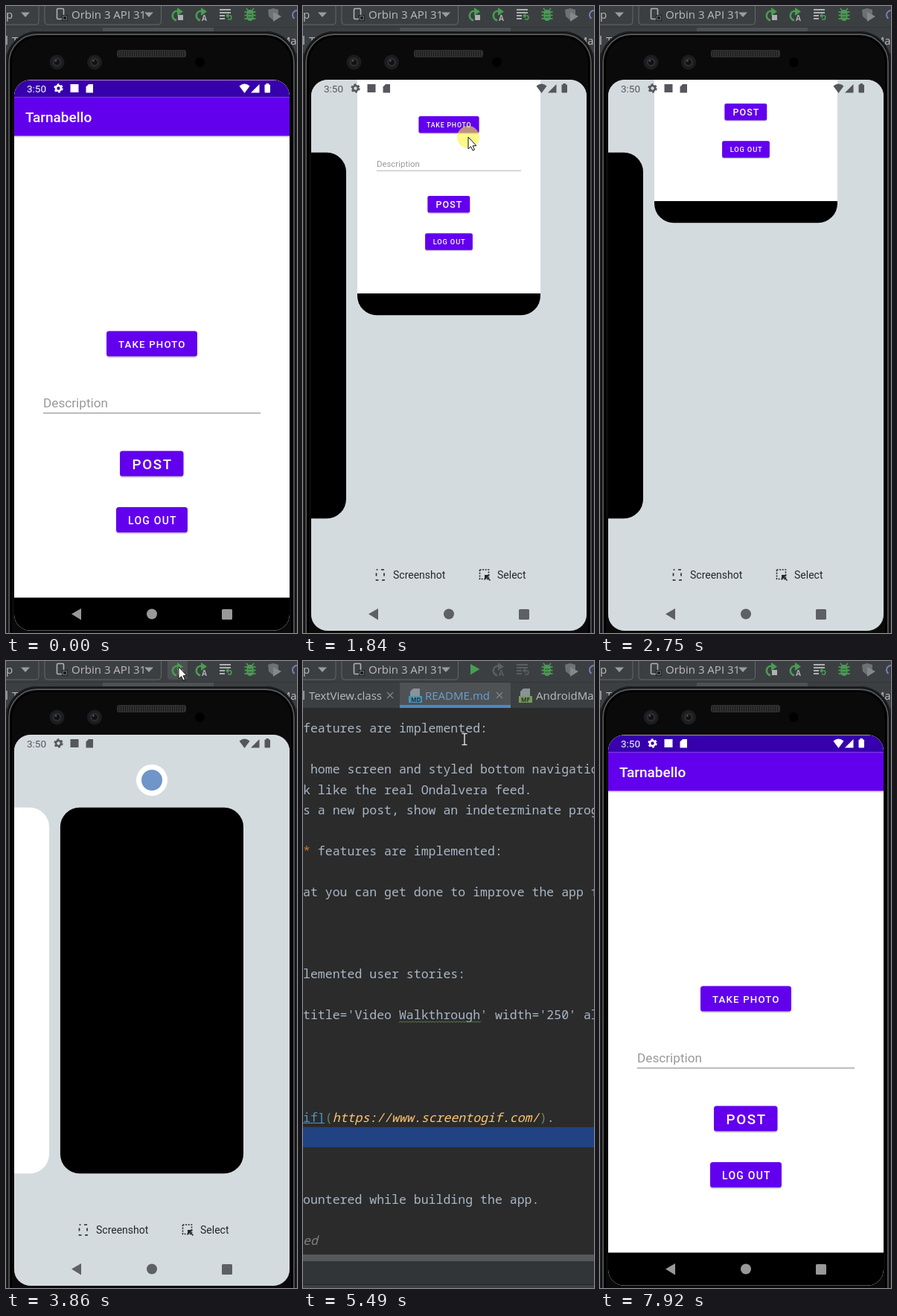
Write an HTML page with a canvas that moves like this. It is 391 px wide and 842 px high and loops after 8 s.

```html
<!DOCTYPE html>
<html lang="en">
<head>
<meta charset="utf-8">
<title>Emulator walkthrough</title>
<style>
  html, body { margin: 0; width: 100%; height: 100%; overflow: hidden; background: #2b2b2b; }
  canvas { display: block; }
</style>
</head>
<body>
<canvas id="stage" width="391" height="842"></canvas>
<script>
const LOOP = 8000;
const ctx = document.getElementById('stage').getContext('2d');
const UI = '"Open Sans", sans-serif', ROBOTO = 'Roboto, sans-serif', MONO = '"Noto Sans Mono", monospace';
const GREEN = '#499c54', DIM = '#5c5f61', GREY = '#afb1b3';

// Keys are [time, ...values]; eased between neighbours, held outside.
function track(t, keys) {
  if (t <= keys[0][0]) return keys[0].slice(1);
  for (let i = 1; i < keys.length; i++) {
    const a = keys[i - 1], b = keys[i];
    if (t < b[0]) {
      const p = (t - a[0]) / (b[0] - a[0]), e = p * p * (3 - 2 * p);
      return a.slice(1).map((v, j) => v + (b[j + 1] - v) * e);
    }
  }
  return keys[keys.length - 1].slice(1);
}

const CURSOR = [
  [500, 297, 850], [640, 297, 807], [1300, 297, 807], [1600, 222, 449], [1840, 222, 176],
  [2120, 222, 149], [2190, 222, 149], [2460, 222, 560], [2500, 222, 560], [2750, 222, 163],
  [2900, 222, 163], [3250, 310, 70], [3590, 375, 6], [3720, 375, 6], [3860, 232, 8],
  [4260, 232, 8], [4820, 210, 124], [5220, 210, 124], [5290, 217, 105], [5490, 217, 105],
  [5780, 232, 10], [5960, 232, 10], [6160, 225, 40], [6360, 225, 40], [6910, 100, 850]];
const CARD_SCALE = [[720, 1], [1060, .655], [1210, .6595], [1420, .665]];
const CARD_LIFT = [[1600, 0], [1840, -273], [2120, -300], [2190, -300], [2370, 13], [2480, 0],
  [2750, -397], [2900, -397], [3080, -620]];
const CARD_SLIDE = [[3050, 0], [3500, 261]];
const OVERLAY = [[1280, 0], [1500, 1]];
const RIPPLE = [[640, 0], [760, 1], [1210, 1], [1400, 0]];
const BADGE = [[3350, 0], [3590, 1]];
const PRESSES = [[640, 780], [1600, 2150], [2500, 2690], [5820, 5900]];

function rect(x, y, w, h, fill, r = 0) {
  ctx.fillStyle = fill;
  ctx.beginPath();
  ctx.roundRect(x, y, w, h, r);
  ctx.fill();
}
function frame(x, y, w, h, r, color, width = 1) {
  ctx.strokeStyle = color;
  ctx.lineWidth = width;
  ctx.beginPath();
  ctx.roundRect(x, y, w, h, r);
  ctx.stroke();
}
function disc(x, y, r, fill) {
  ctx.fillStyle = fill;
  ctx.beginPath();
  ctx.arc(x, y, r, 0, 7);
  ctx.fill();
}
function poly(points, fill) {
  ctx.fillStyle = fill;
  ctx.beginPath();
  for (let i = 0; i < points.length; i += 2) ctx.lineTo(points[i], points[i + 1]);
  ctx.closePath();
  ctx.fill();
}
function line(points, color, width = 1) {
  ctx.strokeStyle = color;
  ctx.lineWidth = width;
  ctx.beginPath();
  for (let i = 0; i < points.length; i += 2) ctx.lineTo(points[i], points[i + 1]);
  ctx.stroke();
}
function arc(x, y, r, from, to, color, width) {
  ctx.strokeStyle = color;
  ctx.lineWidth = width;
  ctx.beginPath();
  ctx.arc(x, y, r, from, to);
  ctx.stroke();
}
function text(s, x, y, font, fill, spacing = 0) {
  ctx.font = font;
  ctx.letterSpacing = spacing + 'px';
  ctx.fillStyle = fill;
  ctx.fillText(s, x, y);
}
function clipped(x, y, w, h, r, draw) {
  ctx.save();
  ctx.beginPath();
  ctx.roundRect(x, y, w, h, r);
  ctx.clip();
  draw();
  ctx.restore();
}

function turnArrow(x, color) {
  arc(x, 13, 6.2, Math.PI * .55, Math.PI * 1.5, color, 2.6);
  poly([x, 2, x + 8, 7.5, x, 13], color);
}

function toolbar(running, playReady, hoverRun) {
  rect(0, 0, 391, 28, '#3c3f41');
  text('p', 0, 17, '15px ' + UI, '#bbb');
  frame(-10, -6, 54, 31, 4, '#646769');
  frame(52, -6, 156.5, 31, 4, '#646769');
  for (const x of [20, 186]) poly([x, 8.5, x + 12, 8.5, x + 6, 15], '#9a9da0');
  frame(68.5, 3.5, 9, 14, 1.5, GREY, 1.6);
  rect(75, 12, 8, 8, '#1f2123');
  frame(76.5, 13.5, 5, 5, 0, '#6d7580');
  text('Orbin 3 API 31', 88, 17, '15px ' + UI, '#bbb');

  if (hoverRun) rect(217, -4, 27, 29, '#4c5052', 4);
  if (running) {
    turnArrow(230, GREEN);
    rect(231, 12, 7, 7, GREY);
  } else poly([225, 4, 237.5, 11, 225, 18.5], playReady ? GREEN : DIM);
  turnArrow(262, running ? GREEN : DIM);
  text('A', 263, 20, 'bold 10px ' + UI, running ? GREY : DIM);
  [[5, 302], [9, 302], [13, 294], [17, 294]].forEach(([y, x]) => rect(287, y - 1, x - 287, 2, running ? GREY : DIM));
  const hook = running ? GREEN : DIM;
  line([298, 13, 302, 13, 303, 15, 302, 18, 298, 18], hook, 1.6);
  poly([299, 9.5, 299, 16.5, 295, 13], hook);

  for (const y of [8, 12.5, 17]) line([320.5, y, 335.5, y], GREEN, 1.8);
  line([323, 3, 326, 7, 330, 7, 333, 3], GREEN, 1.6);
  rect(323.5, 5, 9, 15, GREEN, 4.5);
  line([325, 11, 331, 11], '#3c3f41');
  line([325, 15, 331, 15], '#3c3f41');
  poly([352, 5, 359, 3, 366, 5, 366, 11, 359, 19, 353, 14], '#6e7174');
  poly([359, 8, 370, 14, 359, 21], '#85888a');
  arc(391, 12, 6, Math.PI * .7, Math.PI * 1.5, '#777fc0', 2);
}

function fileIcon(x, label, color) {
  poly([x + 6, 37, x + 15, 37, x + 15, 48, x + 2, 48, x + 2, 41], '#8b9398');
  rect(x, 47, 18, 9, color);
  text(label, x + 3, 54.5, 'bold 8px ' + UI, '#263036');
}
function closeMark(x) {
  line([x - 4, 42, x + 4, 50], '#7f8385', 1.2);
  line([x + 4, 42, x - 4, 50], '#7f8385', 1.2);
}
function tabs(hover) {
  rect(0, 28, 391, 35, '#3c3f41');
  rect(0, 28, 391, 1, '#323537');
  rect(130, 29, 149, 30, hover ? '#484c4e' : '#4e5254');
  rect(130, 59, 149, 4, '#4a88c7');
  rect(-8, 40, 10, 12, '#8b9398');
  text('TextView.class', 8, 52, '15px ' + UI, '#bbb');
  closeMark(117);
  fileIcon(142, 'MD', '#4b93b5');
  text('README.md', 164, 52, '15px ' + UI, '#6aa0cf');
  closeMark(264);
  fileIcon(290, 'MF', '#7b9a5c');
  text('AndroidManifest.xml', 313, 52, '15px ' + UI, '#bbb');
}

const CODE = [
  [0, 'features are implemented:'],
  [2, ' home screen and styled bottom navigation'],
  [3, 'k like the real Ondalvera feed.'],
  [4, 's a new post, show an indeterminate progress'],
  [6, '  features are implemented:'],
  [8, 'at you can get done to improve the app fu'],
  [12, 'lemented user stories:'],
  [14, "title='Video Walkthrough' width='250' alt"],
  [23, 'ountered while building the app.']];
const COL = 9.93;
function editor() {
  rect(0, 63, 391, 779, '#2b2b2b');
  rect(0, 626, 391, 27, '#214283');
  const font = '16.55px ' + MONO;
  const put = (row, col, s, color = '#a9b7c6', style = '') =>
    text(s, col * COL, 96 + 27.5 * row, style + font, color);
  CODE.forEach(([row, s]) => put(row, 0, s));
  put(6, 0, '*', '#cc7832');
  put(19, 0, 'if]', '#4a94cf');
  rect(0, 620, 29, 1, '#4a94cf');
  put(19, 3, '(', '#6a8759');
  put(19, 4, 'https://www.screentogif.com/', '#ffc66d', 'italic ');
  put(19, 32, ')', '#6a8759');
  put(19, 33, '.');
  put(25, 0, 'ed', '#808080', 'italic ');
  const wave = [];
  for (let x = 129; x <= 239; x += 2) wave.push(x, x % 4 === 1 ? 485.5 : 483.5);
  line(wave, '#5f8a52');
  rect(0, 797, 391, 9, '#555758');
  rect(0, 806, 391, 36, '#313537');
  rect(0, 837, 391, 1, '#222526');
  rect(0, 838, 391, 4, '#3c3f41');
}

function button(x, y, w, label, textX, baseline, size) {
  rect(x, y + 1.5, w, 34.5, 'rgba(0,0,0,.18)', 4);
  rect(x, y, w, 34, '#6200ee', 3.5);
  text(label, textX, baseline, `500 ${size}px ${ROBOTO}`, '#fff', size * .089);
}
function app() {
  rect(11, 99, 370, 740, '#fff');
  rect(11, 174, 370, 2, '#ddd');
  rect(11, 99, 370, 23, '#3700ad');
  rect(11, 122, 370, 52, '#6200ee');
  text('Tarnabello', 26, 155, '500 19px ' + ROBOTO, '#fff');
  button(135, 436, 122, 'TAKE PHOTO', 151, 458, 13.25);
  text('Description', 50, 538, '17.2px ' + ROBOTO, '#999');
  rect(50, 545.5, 292, 1.2, '#999');
  button(153, 597, 85.5, 'POST', 169.5, 621.5, 18.8);
  button(148, 672.5, 96, 'LOG OUT', 164, 695, 14);
  rect(11, 794, 370, 45, '#000');
}

function wallpaper() {
  const sky = ctx.createLinearGradient(0, 99, 20, 700);
  [[0, '#c3a4b5'], [.35, '#c19dac'], [.65, '#bd93a2'], [.8, '#a67d94'], [.92, '#8b6c8a'], [1, '#8d7291']]
    .forEach(([p, c]) => sky.addColorStop(p, c));
  rect(11, 99, 370, 740, sky);
  const hills = ctx.createLinearGradient(0, 690, 0, 839);
  hills.addColorStop(0, '#695a7c');
  hills.addColorStop(1, '#594c64');
  poly([11, 704, 40, 697, 62, 691, 95, 697, 120, 686, 150, 688, 190, 698, 218, 707, 250, 705,
    290, 699, 335, 697, 360, 691, 381, 687, 381, 839, 11, 839], hills);
}

function statusIcons(color) {
  text('3:50', 28, 115.5, '13.5px ' + ROBOTO, color);
  arc(70.5, 110.5, 3.5, 0, 7, color, 2.6);
  ctx.setLineDash([2.8, 2.8]);
  arc(70.5, 110.5, 5.3, 0, 2 * Math.PI, color, 1.8);
  ctx.setLineDash([]);
  rect(86.5, 105, 11, 11, color);
  poly([111, 105, 117, 105, 117, 116.5, 107.5, 116.5, 107.5, 108.5], color);
  ctx.fillStyle = color;
  ctx.beginPath();
  ctx.moveTo(320.5, 117);
  ctx.lineTo(313.5, 107.5);
  ctx.quadraticCurveTo(320.5, 101.5, 327.5, 107.5);
  ctx.fill();
  poly([329, 116.5, 340.5, 116.5, 340.5, 105], color);
  rect(347.5, 105.5, 7.5, 11, color, 1);
  rect(349.5, 104, 3.5, 2, color);
}
function navIcons(color) {
  poly([88, 816.5, 101, 809, 101, 824.5], color);
  disc(196, 816.5, 7, color);
  rect(290, 810, 14, 14, color, 1.5);
}

function actions() {
  const ink = '#24272a';
  ctx.setLineDash([4, 4.5]);
  ctx.lineDashOffset = 2;
  frame(98.5, 757, 10.5, 14, 0, ink, 1.6);
  ctx.lineDashOffset = 0;
  ctx.setLineDash([2, 1.6]);
  frame(237.5, 757, 12, 12.5, 0, ink, 1.6);
  ctx.setLineDash([]);
  poly([244, 764, 251, 764, 244, 771], ink);
  line([246, 766, 251.5, 771.5], ink, 1.6);
  text('Screenshot', 121, 769, '14px ' + ROBOTO, ink);
  text('Select', 261, 769, '14px ' + ROBOTO, ink);
}

function screen(t) {
  const [k] = track(t, CARD_SCALE), [lift] = track(t, CARD_LIFT), [slide] = track(t, CARD_SLIDE);
  const [grey] = track(t, OVERLAY), [ripple] = track(t, RIPPLE), [badge] = track(t, BADGE);
  const shrink = (1 - k) / .335, w = 370 * k, h = 739 * k;
  const x = 196 - w / 2, y = 469 - 26.5 * shrink - h / 2, r = 20 + 6 * shrink;

  wallpaper();
  ctx.globalAlpha = grey;
  rect(11, 99, 370, 740, '#d4dbdf');
  actions();
  ctx.globalAlpha = 1;

  const step = w + 15;
  rect(x - step + slide, y, w, h, '#000', r);
  if (slide) rect(x - 2 * step + slide, y, w, h, '#fff', r);
  clipped(x, y + lift, w, h, r, () => {
    ctx.translate(x, y + lift);
    ctx.scale(k, k);
    ctx.translate(-11, -99);
    app();
  });

  ctx.globalAlpha = badge;
  disc(196, 160, 21, '#fff');
  disc(196, 160, 14, '#6f95c9');
  ctx.globalAlpha = 1;

  rect(251, 794, 91, 45, `rgba(255,255,255,${.13 * ripple})`, 22);
  statusIcons(grey > .5 ? '#55575d' : '#fff');
  navIcons(grey > .5 ? '#5d6064' : k < 1 ? '#fff' : '#999');
}

function emulator(t) {
  rect(0, 34, 391, 900, '#0a0a0a', 42);
  frame(1, 35, 389, 900, 41, '#1d1e1f', 2);
  frame(4, 38, 383, 900, 38, '#55575a', 1.8);
  frame(7, 41, 377, 900, 35, '#000', 2);
  rect(149, 59, 93, 10, '#303030', 3);
  for (let x = 151; x < 241; x += 3) rect(x, 60, 1, 8, '#1b1b1b');
  for (const x of [68.5, 119]) {
    disc(x, 75.5, 10, '#1c1d1f');
    disc(x, 75.5, 6, '#2a2c30');
    disc(x, 75.5, 3.5, '#101114');
    disc(x - 1.5, 73.5, 1.2, '#555a60');
  }
  disc(260.5, 75.5, 6.5, '#000');
  clipped(11, 99, 370, 740, 22, () => screen(t));
}

function pointer(t, x, y, inEditor) {
  if (PRESSES.some(([a, b]) => t >= a && t < b)) disc(x, y, 15, 'rgba(252,244,60,.6)');
  if (inEditor) {
    line([x, y - 7, x, y + 7], '#e6e6e6', 1.4);
    for (const dy of [-7.5, 7.5]) line([x - 3.5, y + dy, x + 3.5, y + dy], '#e6e6e6', 1.3);
    return;
  }
  const shape = [0, 0, 0, 16, 3.6, 12.7, 6, 18, 8.5, 17, 6.2, 11.7, 11, 11.7, 0, 0]
    .map((v, i) => v + (i % 2 ? y : x));
  poly(shape, '#fff');
  line(shape, '#111');
}

function draw() {
  const t = performance.now() % LOOP;
  const emulatorOn = t < 3990 || t >= 7850;
  const running = t < 4060 || t >= 6020;
  const visible = (t >= 500 && t < 2690) || (t >= 2900 && t < 6910);
  const [x, y] = track(t, CURSOR);
  const overRun = visible && y < 27 && x > 217 && x < 244;
  const overTab = visible && !emulatorOn && y > 28 && y < 62;

  editor();
  tabs(overTab);
  toolbar(running, t >= 5020, overRun);
  if (emulatorOn) emulator(t % 7850);
  if (visible) pointer(t, x, y, !emulatorOn && y > 62 && y < 797);
  requestAnimationFrame(draw);
}
draw();
</script>
</body>
</html>
```
